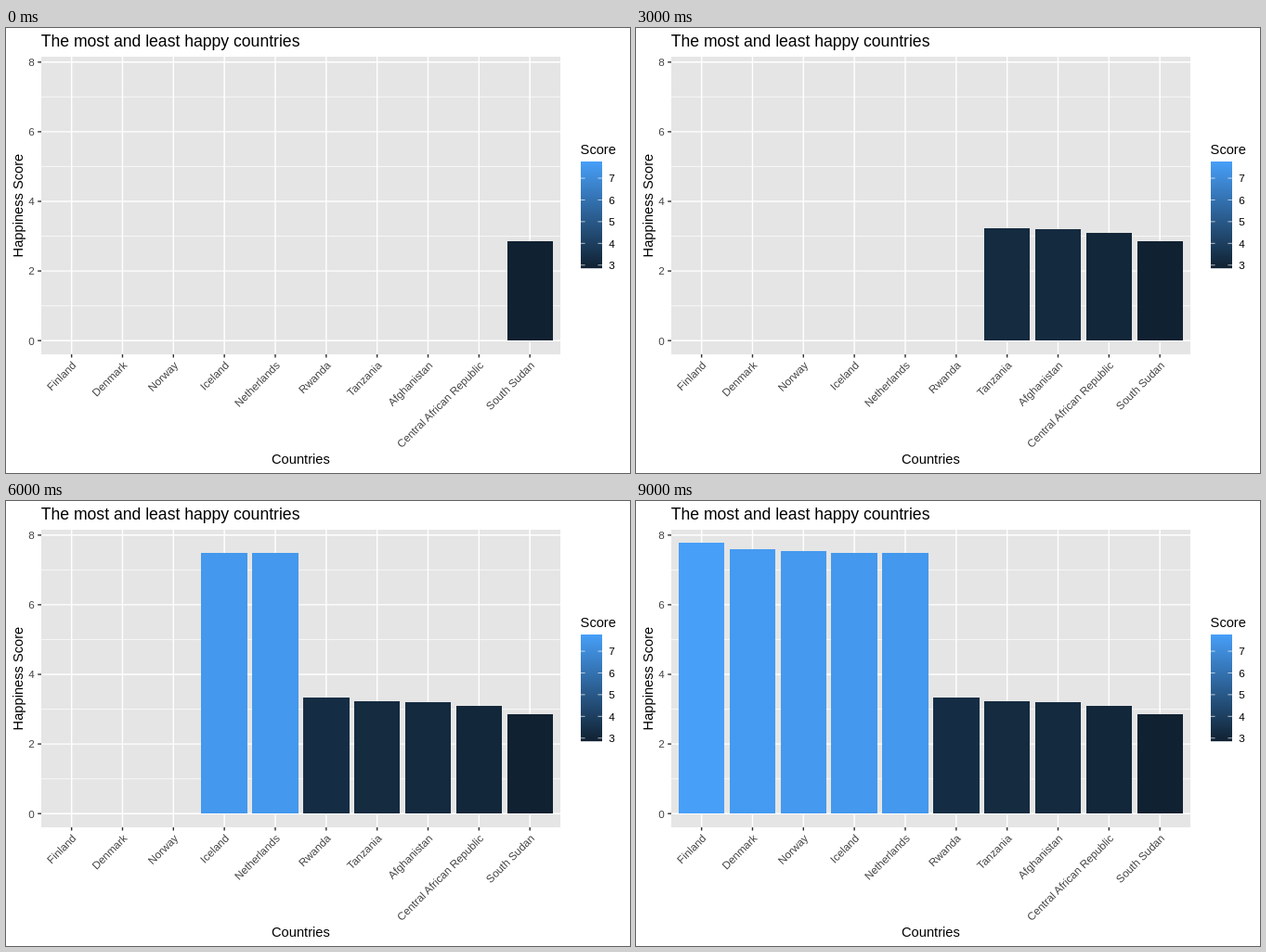
Animation of 672x480 px, one loop 10000 ms. Source, as an HTML page:

```html
<!DOCTYPE html>
<html lang="en">
<head>
<meta charset="utf-8">
<title>The most and least happy countries</title>
<style>
  html, body { margin: 0; width: 100%; height: 100%; overflow: hidden; background: #fff; }
  svg { display: block; width: 672px; height: 480px; }
  text { font-family: "Liberation Sans", Arial, sans-serif; font-size: 14.67px; fill: #000; }
  .title { font-size: 17.6px; }
  .small { font-size: 11.73px; }
  .axis { fill: #444; }
  .end { text-anchor: end; }
  .middle { text-anchor: middle; }
</style>
</head>
<body>
<svg id="chart" viewBox="0 0 672 480">
  <defs>
    <linearGradient id="ramp" x1="0" y1="0" x2="0" y2="1"></linearGradient>
  </defs>
</svg>
<script>
const LOOP = 10000, STATE = 1000, ENTER = 200, FRAME = 100, STEPS = 3;
const scores = [
  ["Finland", 7.769], ["Denmark", 7.6], ["Norway", 7.554], ["Iceland", 7.494],
  ["Netherlands", 7.488], ["Rwanda", 3.334], ["Tanzania", 3.231],
  ["Afghanistan", 3.203], ["Central African Republic", 3.083], ["South Sudan", 2.853]
];
const MAX = scores[0][1], MIN = scores[9][1];
const LOW = [16, 33, 49], HIGH = [71, 159, 248];
const panel = { left: 38, top: 31, right: 597, bottom: 352 };
const STEP = 54.84, BAR = STEP * 0.9;

const chart = document.getElementById("chart");
const centerX = i => 70.63 + STEP * i;
const scaleY = v => 337.2 - 37.55 * v;
const legendY = v => 144 + (MAX - v) * 115.2 / (MAX - MIN);

function shade(score) {
  const t = (score - MIN) / (MAX - MIN);
  return `rgb(${LOW.map((c, k) => Math.round(c + (HIGH[k] - c) * t))})`;
}

function add(tag, attrs, parent = chart) {
  const node = document.createElementNS("http://www.w3.org/2000/svg", tag);
  for (const key in attrs) node.setAttribute(key, attrs[key]);
  parent.append(node);
  return node;
}

const line = (x1, y1, x2, y2, stroke, width) =>
  add("line", { x1, y1, x2, y2, stroke, "stroke-width": width });
const rect = (x, y, width, height, fill) => add("rect", { x, y, width, height, fill });

function label(string, x, y, cls = "", angle = 0) {
  const node = add("text", { class: cls, transform: `translate(${x} ${y}) rotate(${angle})` });
  node.textContent = string;
}

// Panel and grid
rect(panel.left, panel.top, panel.right - panel.left, panel.bottom - panel.top, "#e5e5e5");
for (let v = 1; v < 8; v += 2)
  line(panel.left, scaleY(v), panel.right, scaleY(v), "#fff", 0.71);
for (let v = 0; v <= 8; v += 2) {
  const y = scaleY(v);
  line(panel.left, y, panel.right, y, "#fff", 1.42);
  line(34.2, y, panel.left, y, "#333", 1.42);
  label(v, 30.9, y + 4.3, "small axis end");
}
scores.forEach(([name], i) => {
  const x = centerX(i);
  line(x, panel.top, x, panel.bottom, "#fff", 1.42);
  line(x, panel.bottom, x, 355.5, "#333", 1.42);
  label(name, x + 5.6, 364.7, "small axis end", -45);
});

const bars = scores.map(([, score], i) => {
  const left = Math.round(centerX(i) - BAR / 2);
  const right = Math.round(centerX(i) + BAR / 2);
  return rect(left, 337, right - left, 0, shade(score));
});

// Titles
label("The most and least happy countries", 37.7, 20, "title");
label("Countries", 317.4, 470, "middle");
label("Happiness Score", 18, 191.6, "middle", -90);

// Colour legend
const ramp = document.getElementById("ramp");
add("stop", { offset: 0, "stop-color": shade(MAX) }, ramp);
add("stop", { offset: 1, "stop-color": shade(MIN) }, ramp);
label("Score", 618.6, 136, "");
rect(619, 144, 23, 115.2, "url(#ramp)");
for (let v = 3; v <= 7; v++) {
  const y = legendY(v);
  line(619, y, 623.6, y, "#fff", 0.67);
  line(637.4, y, 642, y, "#fff", 0.67);
  label(v, 649.2, y + 4.3, "small");
}

// Bars enter from right to left, growing and fading in
function entered(order, time) {
  if (order === 0) return 1;
  const step = Math.floor((time - order * STATE + ENTER) / FRAME) + 1;
  return Math.min(Math.max(step / STEPS, 0), 1);
}

function draw(now) {
  const time = now % LOOP;
  bars.forEach((bar, i) => {
    const p = entered(bars.length - 1 - i, time);
    const top = Math.round(scaleY(scores[i][1] * p));
    bar.setAttribute("y", top);
    bar.setAttribute("height", 337 - top);
    bar.setAttribute("opacity", p);
  });
}

const start = performance.now();
function tick() {
  draw(performance.now() - start);
  requestAnimationFrame(tick);
}
tick();
</script>
</body>
</html>
```
